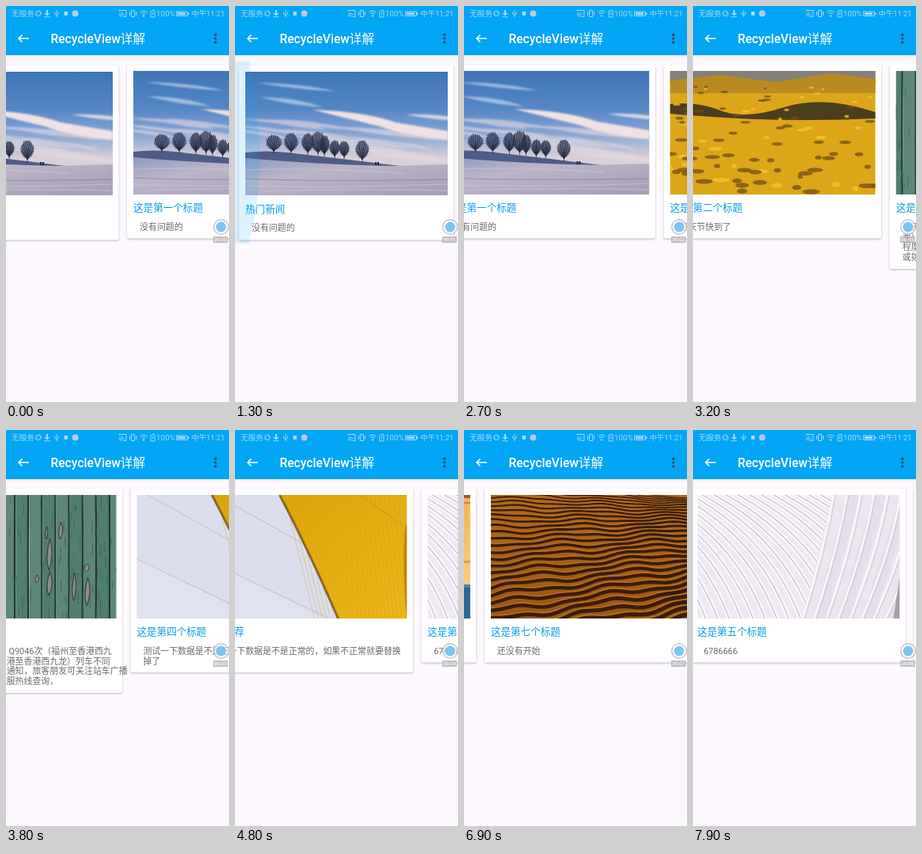
An HTML page that plays this animation: 282 by 500 pixels, repeating every 8000 ms.

```html
<!DOCTYPE html>
<html lang="zh-CN">
<head>
<meta charset="utf-8">
<style>
  html, body { margin: 0; width: 100%; height: 100%; overflow: hidden; background: #fdf8fd; }
  svg { display: block; width: 100vw; height: 100vh; }
  text { font-family: Roboto, "Noto Sans CJK SC", "Noto Sans CJK", sans-serif; white-space: pre; }
  .card { fill: #fff; filter: drop-shadow(0 1px 1px rgba(40, 30, 60, .32)); }
  .heading { font-size: 12.57px; fill: #0c9ce4; }
  .body { font-size: 10.93px; fill: #6c6870; }
</style>
</head>
<body>
<svg id="stage" viewBox="0 0 282 500">
  <defs>
    <clipPath id="photo"><rect width="256" height="156"/></clipPath>
    <clipPath id="fold"><path d="M0 0H184L133 156H0Z"/></clipPath>
    <linearGradient id="sky" x2="0" y2="1">
      <stop offset="0" stop-color="#3d74b6"/><stop offset=".3" stop-color="#5586c4"/>
      <stop offset=".52" stop-color="#89a8d6"/><stop offset=".7" stop-color="#d9cfd8"/>
    </linearGradient>
    <linearGradient id="snow" x2=".8" y2="1">
      <stop offset="0" stop-color="#7f92c0"/><stop offset=".45" stop-color="#bdb6cb"/><stop offset="1" stop-color="#a8a0b6"/>
    </linearGradient>
    <linearGradient id="gold" x2="1" y2="1">
      <stop offset="0" stop-color="#dda408"/><stop offset="1" stop-color="#ecb61c"/>
    </linearGradient>
    <linearGradient id="wall" x2="0" y2="1">
      <stop offset="0" stop-color="#f0b64c"/><stop offset="1" stop-color="#f6d69a"/>
    </linearGradient>
    <linearGradient id="dune" x2="0" y2="1">
      <stop offset="0" stop-color="#b0691f"/><stop offset="1" stop-color="#9a560f"/>
    </linearGradient>
    <linearGradient id="drop" x2="0" y2="1">
      <stop offset="0" stop-color="#000" stop-opacity=".09"/><stop offset="1" stop-color="#000" stop-opacity="0"/>
    </linearGradient>
    <filter id="soft"><feGaussianBlur stdDeviation="1.1 .8"/></filter>
  </defs>

  <rect width="282" height="500" fill="#fdf8fd"/>
  <g id="cards"></g>
  <path id="glow" fill="#03a9f4"/>

  <rect y="62" width="282" height="3" fill="url(#drop)"/>
  <rect width="282" height="62" fill="#03a5f5"/>

  <g fill="#fff" opacity=".62" font-size="9.6">
    <text x="7" y="13.4">无服务</text>
    <text x="190" y="13.2" font-size="9.8">100%</text>
    <text x="234.5" y="13.4" font-size="9.4">中午11:21</text>
    <circle cx="41" cy="9.5" r="3" fill="none" stroke="#fff" stroke-width="2" stroke-dasharray="1.4 .9"/>
    <path d="M51 5h2v4h2.5L52 12.5 48.500 9H51zM48.500 13.200h7v1h-7z"/>
    <path d="M64 5v9M61.500 8v2l2.500 2 2.500-2V7.500" fill="none" stroke="#fff"/>
    <rect x="73.500" y="7" width="4.500" height="5"/>
    <g fill="none" stroke="#fff">
      <path d="M143 7V5.500h9v8h-3.500M143 9.500a4 4 0 0 1 4 4M143 11.500a2 2 0 0 1 2 2M146 8l4 4"/>
      <path d="M158.500 5.500h4v8h-4zM156.500 7v5M164.500 7v5"/>
      <path d="M169.500 8a6.500 6.500 0 0 1 9 0M171.200 10a4 4 0 0 1 5.600 0"/>
      <path d="M183 7l2-1.500h3v8.500h-5zM185.500 8v3"/>
      <path d="M215.500 7h14v5.500h-14z"/>
    </g>
    <circle cx="174" cy="12.500" r="1.200"/>
    <path d="M217 8.300h10v3h-10zM230 8.500h1.500v2.500H230z"/>
  </g>
  <circle cx="87.500" cy="9.500" r="4" fill="#b9c6ea"/>

  <path d="M29 41H16M20.500 36.500L16 41l4.500 4.500" fill="none" stroke="#fff" stroke-width="1.500"/>
  <text x="56.500" y="46.600" font-size="15.600" fill="#fff"><tspan font-weight="500">RecycleView</tspan>详解</text>
  <g fill="#30506a"><circle cx="264.800" cy="36.200" r="1.800"/><circle cx="264.800" cy="41" r="1.800"/><circle cx="264.800" cy="45.800" r="1.800"/></g>

  <circle cx="272" cy="279" r="9.300" fill="#fff" fill-opacity=".65" stroke="#b4b4bc" stroke-opacity=".75" stroke-width="1.500"/>
  <circle cx="272" cy="279" r="6.400" fill="#74c0f0" fill-opacity=".92"/>
  <rect x="262" y="291" width="18.500" height="8" rx="1" fill="#a8a4ac" fill-opacity=".7"/>
  <text id="clock" x="271.200" y="297.300" font-size="6.200" font-weight="500" text-anchor="middle" fill="#fff"></text>
</svg>
<script>
const LOOP = 8000, PITCH = 282, SWIPE = 480;

const range = n => [...Array(n).keys()];
const rect = (x, y, w, h, fill) => `<rect x="${x}" y="${y}" width="${w}" height="${h}" fill="${fill}"/>`;
const fill = (d, color, more = '') => `<path d="${d}" fill="${color}" ${more}/>`;
const line = (d, color, width = 1, more = '') =>
  `<path d="${d}" fill="none" stroke="${color}" stroke-width="${width}" ${more}/>`;
const noise = n => { const v = Math.sin(n * 127.1 + 3.7) * 43758.5; return v - Math.floor(v); };

function tree(x, base, height, width) {
  const crown = range(13).map(i => {
    const a = Math.PI * (i / 12 - 1), reach = .85 + noise(i + x) * .2;
    const tipX = x + Math.cos(a) * width / 2 * reach, tipY = base - height * (.5 - Math.sin(a) * .5 * reach);
    return `M${x} ${base - height * .12}Q${(x + tipX * 2) / 3} ${base - height * .4} ${tipX} ${tipY}`;
  }).join('');
  return `<ellipse cx="${x}" cy="${base - height * .56}" rx="${width * .45}" ry="${height * .4}" fill="#39405c" opacity=".55"/>` +
    line(`M${x} ${base}v${-height * .6}` + crown, '#242a42', .8);
}

// A tapered wisp of cloud that falls gently to the right.
const wisp = (x, y, length, thick, drop) =>
  `M${x} ${y}Q${x + length * .6} ${y + drop * .35 - thick} ${x + length} ${y + drop}Q${x + length * .5} ${y + drop * .5 + thick} ${x} ${y}Z`;

function winter() {
  const trees = [[36, 103, 24, 21], [58, 104, 27, 19], [79, 105, 28, 17], [92, 106, 31, 20], [100, 107, 27, 14],
    [113, 109, 23, 14], [125, 110, 23, 14], [148, 114, 28, 18]];
  const wisps = range(16).map(i => {
    const x = noise(i) * 210 - 20;
    return wisp(x, 54 + x * .12 + noise(i + 30) * 32, 60 + noise(i + 60) * 90, 1.5 + noise(i + 90) * 3, 12);
  }).join('');
  return rect(0, 0, 256, 156, 'url(#sky)') +
    '<g filter="url(#soft)">' +
    fill(wisp(15, 14, 100, 3, 11) + wisp(18, 32, 80, 4, 13), '#b8cce6', 'opacity=".75"') +
    fill(wisp(203, 54, 80, 4, 8), '#e2e2ec', 'opacity=".85"') +
    fill('M85 48Q150 50 190 64L256 75V86Q205 82 170 69Q125 58 85 48Z', '#f0e2e4') +
    fill(wisps, '#ecdde0', 'opacity=".6"') +
    '</g>' +
    fill('M0 103Q30 98 70 105Q125 111 178 119L256 117V156H0Z', 'url(#snow)') +
    fill('M0 102Q30 98 70 104Q125 110 195 119Q105 118 0 109Z', '#505c88') +
    trees.map(t => tree(...t)).join('') +
    rect(164, 114, 2, 4, '#20243a') + rect(167, 114, 2, 4, '#20243a') +
    line('M0 135Q90 139 256 136', '#746f8c', .8, 'opacity=".7"') +
    line('M0 124Q90 121 200 128M0 144Q130 147 256 142M20 151Q130 147 256 150', '#d0c8d8', 1.5, 'opacity=".45"');
}

function autumn() {
  const spots = range(90).map(i => {
    const y = 20 + noise(i) * 135, size = 1 + y / 60;
    return `<ellipse cx="${noise(i + 200) * 256}" cy="${y}" rx="${size * (1 + noise(i + 9) * 2.5)}" ry="${size * .9}" fill="${i % 3 ? '#6f4f14' : '#f4c535'}" opacity=".75"/>`;
  }).join('');
  return rect(0, 0, 256, 156, '#dba617') + rect(0, 0, 256, 18, '#858078') +
    fill('M0 12L60 5L130 14L200 3L256 10V28H0Z', '#b98a20') +
    fill('M0 42Q30 38 60 50T140 46T256 52V60Q130 66 0 54Z', '#4b3e1e') + spots;
}

function planks() {
  const boards = range(16).map(i => {
    const x = 8 + i * 17.1;
    return rect(x - 16, 0, 16, 156, i % 2 ? '#5c8778' : '#527e71') +
      line(`M${x} 0q${noise(i) * 2 - 1} 80 0 156`, '#22342f', 2.2);
  }).join('');
  const grain = range(130).map(i =>
    `M${noise(i) * 256} ${noise(i + 300) * 156}q${noise(i + 700) * 2 - 1} 5 0 ${4 + noise(i + 500) * 14}`).join('');
  const chips = [[172, 75, 4, 20], [172, 112, 4, 15], [186, 45, 3, 11], [220, 122, 4, 18], [203, 116, 3, 18],
    [156, 106, 3, 5], [168, 48, 2, 8], [219, 92, 4, 5], [60, 60, 3, 16], [95, 110, 4, 14]];
  return boards + line(grain, '#36564c', .9, 'opacity=".7"') + chips.map(([x, y, w, h]) =>
    fill(`M${x} ${y - h}q${w * 1.5} ${h} ${-w * .3} ${h * 2}q${-w * 1.3} ${-h * .7} ${w * .3} ${-h * 2}`, '#8f8d8a',
      'stroke="#2c3834" stroke-width="1"')).join('');
}

function facade() {
  const ribs = range(28).map(i => `M${101 + i * 6} 0l${38 - i} 156`).join('');
  return rect(0, 0, 256, 156, '#dcdded') + fill('M0 80L150 156H0Z', '#e1e2ef') +
    line('M14 0L140 70M0 81L164 159', '#a9a294', .8, 'stroke-dasharray="1.500 1"') +
    fill('M95 0H256V156H169Q130 66 95 0Z', 'url(#gold)') +
    line(ribs, '#c99608', .6, 'opacity=".5" clip-path="url(#photo)"') +
    line('M196 0L256 42', '#b18410', .8, 'stroke-dasharray="1.500 1"') +
    fill('M253 45L256 35V156Q250 110 253 45Z', '#bb850a') +
    line('M95 0Q130 66 169 156', '#8b6824', 3);
}

function pleats() {
  const left = range(26).map(i => {
    const x = i * 15 - 215;
    return `M${x} -6Q${x + 112} 50 ${x + 152} 160`;
  }).join('');
  const right = range(9).map(k => [172 + k * 17, 133 + k * 15]);
  return rect(0, 0, 256, 156, '#efe7f1') +
    `<g clip-path="url(#fold)">${line(left, '#faf6fb', 6)}${line(left, '#d0c4d4', 1.4)}</g>` +
    right.map(([a, b], k) => fill(`M${a} 0H${a + 17}L${b + 15} 156H${b}Z`, k % 2 ? '#e6deea' : '#ece5ef') +
      line(`M${a} 0Q${a - 12} 70 ${b} 156`, '#fff', 1.6) +
      line(`M${a + 3} 0Q${a - 9} 70 ${b + 3} 156`, '#cbc0d0', .8)).join('') +
    fill('M256 104V156H248Z', '#a59daa');
}

function seaside() {
  return rect(0, 0, 256, 156, 'url(#wall)') + rect(0, 0, 256, 4, '#9a5c38') + rect(0, 9, 256, 2, '#c98545') +
    rect(0, 83, 256, 3, '#e4a04a') + rect(0, 113, 256, 43, '#2d6690') + rect(0, 113, 256, 4, '#5684a0');
}

function desert() {
  const COUNT = 30;
  const ripple = i => {
    const depth = i / COUNT, gap = 2.5 + depth * 9;
    const base = -8 + i * 2.5 + 135 * depth * depth;
    const points = range(65).map(k => {
      const x = k * 4;
      const wave = Math.sin(x / (15 + depth * 8) + i * .45) + .5 * Math.sin(x / 9 - i * .8);
      return `${x} ${(base + gap * .3 * wave + (x - 128) * (.1 - .32 * depth)).toFixed(1)}`;
    });
    const d = 'M' + points.join('L');
    return line(d, '#3a1c08', gap * .5) +
      line(d, '#c67d2e', gap * .14, `opacity=".7" transform="translate(0 ${-gap * .34})"`);
  };
  return rect(0, 0, 256, 156, 'url(#dune)') + range(COUNT).map(ripple).join('');
}

const cards = [
  { title: '热门新闻', art: winter, lines: ['没有问题的'], drop: 1 },
  { title: '这是第一个标题', art: winter, lines: ['没有问题的'] },
  { title: '这是第二个标题', art: autumn, lines: ['国庆节快到了'] },
  { title: '这是第三个标题', art: planks, lines: ['受天气影响今日开行的 Q9046次（福州至香港西九',
    '龙）及返程（福州至香港至香港西九龙）列车不同', '程度晚点请您留意车站通知，旅客朋友可关注站车广播', '或拨打车站客服电话客服热线查询，'] },
  { title: '这是第四个标题', art: facade, lines: ['测试一下数据是不是正常的，如果不正常就要替换', '掉了'] },
  { title: '热门推荐', art: facade, lines: ['测试一下数据是不是正常的，如果不正常就要替换', '掉了'] },
  { title: '这是第五个标题', art: pleats, lines: ['6786666'] },
  { title: '这是第六个标题', art: seaside, lines: ['暂无数据'] },
  { title: '这是第七个标题', art: desert, lines: ['还没有开始'] },
];

function cardMarkup({ title, art, lines, drop = 0 }) {
  const height = 219.5 + drop + (lines.length - 1) * 12.8;
  return `<g><rect class="card" y="${74 + drop}" width="271.5" height="${height}" rx="2"/>` +
    `<g transform="translate(8 ${82 + drop})" clip-path="url(#photo)">${art()}</g>` +
    `<text class="heading" x="8" y="${259.4 + drop * 1.5}">${title}</text>` +
    lines.map((s, i) => `<text class="body" x="16" y="${282.8 + drop * 1.5 + i * 12.8}">${s}</text>`).join('') + '</g>';
}

const byId = id => document.getElementById(id);
byId('cards').innerHTML = cards.map(cardMarkup).join('');
const nodes = [...byId('cards').children];

// Each swipe: start time, page change.
const swipes = [[-247, -1], [1900, 1], [2596, 1], [3090, 1], [3574, 1], [4130, 1], [4670, 1],
  [5300, 1], [5900, 1], [6821, -1], [7468, -1]];
const clamp = v => Math.max(0, Math.min(1, v));
const smooth = u => u * u * (3 - 2 * u);
const scrollAt = t => PITCH * swipes.reduce((page, [start, step]) => page + step * smooth(clamp((t - start) / SWIPE)), 1);

function draw(t) {
  const scroll = scrollAt(t);
  nodes.forEach((node, i) => {
    const x = 5 + i * PITCH - scroll;
    node.setAttribute('transform', `translate(${x.toFixed(2)} 0)`);
    node.style.display = x > -276 && x < 286 ? '' : 'none';
  });
  const pull = Math.sin(Math.PI * clamp((t - 1000) / 700));
  const edge = 18 * pull;
  byId('glow').setAttribute('d', `M0 70H${edge}Q${edge * 2.6} 185 ${edge} 300H0Z`);
  byId('glow').setAttribute('opacity', .14 * pull);
  byId('clock').textContent = '00:0' + Math.floor((t + 100) / 1000);
}

const origin = performance.now();
function tick() {
  draw((performance.now() - origin) % LOOP);
  requestAnimationFrame(tick);
}
draw(0);
tick();
</script>
</body>
</html>
```
